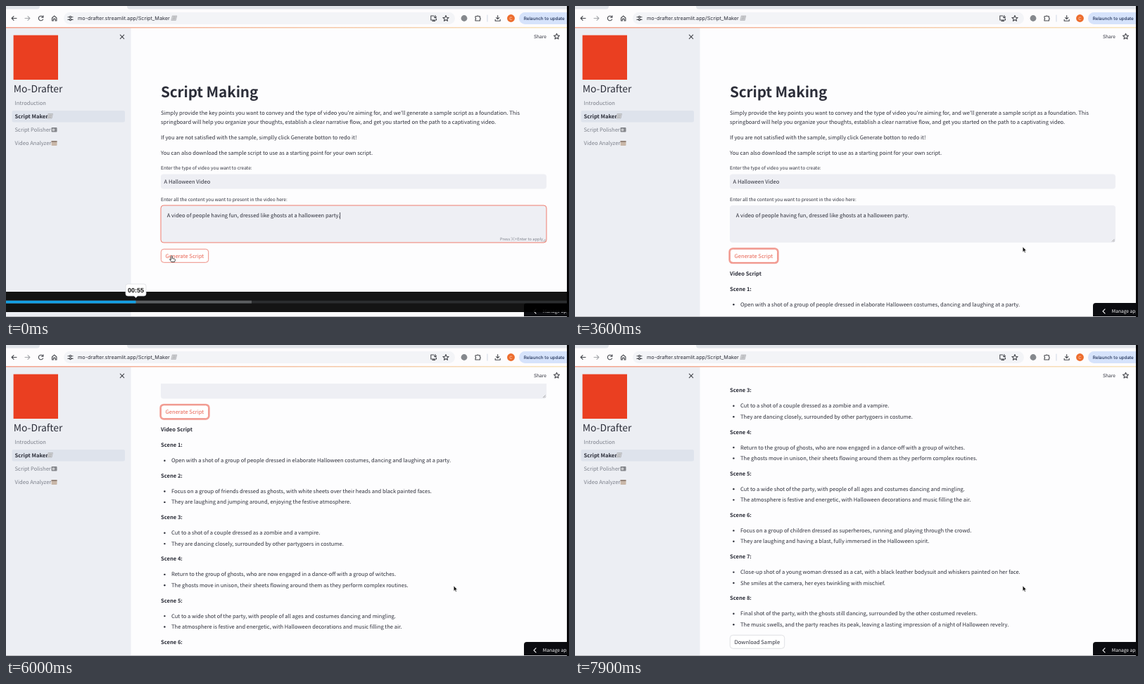
Recreate the animation shown at these times as an HTML page. Size 800x443 px, loop 8000 ms.

```html
<!DOCTYPE html>
<html lang="en">
<head>
<meta charset="utf-8">
<title>Script Making</title>
<style>
  html, body { margin: 0; width: 100%; height: 100%; overflow: hidden; background: #fdfdfe; }
  svg { display: block; width: 100vw; height: 100vh; }
  text {
    font-family: "Noto Sans CJK JP", "Noto Sans CJK SC", "Noto Sans CJK", sans-serif;
    font-size: 7.58px; fill: #2c2e39; text-rendering: geometricPrecision; white-space: pre;
  }
  .small { font-size: 6.62px; }
  .bold { font-weight: 700; }
  .ui { font-family: Inter, Roboto, sans-serif; }
  .muted { fill: #7d808b; }
  .coral { fill: #e8604f; }
  .icon { fill: none; stroke: #45474d; stroke-width: 1.1; stroke-linecap: round; stroke-linejoin: round; }
  .field { fill: #eeeff4; }
</style>
</head>
<body>
<svg viewBox="0 0 800 443" preserveAspectRatio="none">
  <defs>
    <linearGradient id="accent">
      <stop offset="0" stop-color="#f3a08c"/><stop offset="1" stop-color="#f7e6bd"/>
    </linearGradient>
    <clipPath id="pageClip"><rect x="178" y="55" width="619" height="388"/></clipPath>
    <path id="star" d="M0-4 1.2-1.3 4.1-1 1.9.9 2.5 3.8 0 2.3-2.5 3.8-1.9.9-4.1-1-1.2-1.3Z"/>
    <g id="sheet">
      <path d="M1.5-3.5H8L6.5 3H0Z" fill="#d5d6d8" stroke="#a3a5aa" stroke-width=".6"/>
      <path d="M2.4-1.8H6.6M2-.1H6.2M1.6 1.5H5.6" stroke="#96989d" stroke-width=".6"/>
    </g>
  </defs>

  <rect width="800" height="443" fill="#fdfdfe"/>

  <g clip-path="url(#pageClip)">
    <g id="page">
      <text class="bold" x="220" y="130.4" style="font-size:20.7px;letter-spacing:-.1px">Script Making</text>
      <text x="220" y="154.7">Simply provide the key points you want to convey and the type of video you're aiming for, and we'll generate a sample script as a foundation. This</text>
      <text x="220" y="168.1">springboard will help you organize your thoughts, establish a clear narrative flow, and get you started on the path to a captivating video.</text>
      <text x="220" y="189.8">If you are not satisfied with the sample, simplly click Generate botton to redo it!</text>
      <text x="220" y="211.8">You can also download the sample script to use as a starting point for your own script.</text>
      <text class="small" x="220" y="233.3">Enter the type of video you want to create:</text>
      <rect class="field" x="220" y="239.5" width="548" height="21" rx="4"/>
      <text x="224.6" y="252.7">A Halloween Video</text>
      <text class="small" x="220" y="277.8">Enter all the content you want to present in the video here:</text>
      <rect class="field" x="220" y="284" width="548" height="53" rx="4"/>
      <text x="228.8" y="301.2">A video of people having fun, dressed like ghosts at a halloween party.</text>
      <path d="M763 335.6 766.6 332M765 335.8 766.8 334" stroke="#888" stroke-width=".7"/>
      <g id="typing">
        <rect x="220" y="284" width="548" height="53" rx="4" fill="none" stroke="#ef7d6e"/>
        <path d="M474.6 294V303.5" stroke="#2c2e39" stroke-width=".8"/>
        <text class="muted" x="702" y="334.4" style="font-size:5.65px">Press ⌘+Enter to apply</text>
      </g>
      <rect id="ring" x="219.4" y="345.4" width="69.2" height="20.8" rx="4.6" fill="none" stroke="#f3a097" stroke-width="2.2"/>
      <rect x="220.3" y="346.3" width="67.4" height="19" rx="4" fill="#fff" stroke="#ec8275" stroke-width=".9"/>
      <text class="coral" x="226.6" y="358.6">Generate Script</text>
      <g id="script"></g>
    </g>
  </g>

  <!-- Sidebar -->
  <rect y="31" width="177.5" height="412" fill="#eceef3"/>
  <rect x="10.6" y="41.6" width="63.4" height="63.4" fill="#ea3f21"/>
  <path class="icon" d="M162.3 41.2 167.7 46.6M167.7 41.2 162.3 46.6"/>
  <text x="10.8" y="123.4" style="font-size:13.9px">Mo-Drafter</text>
  <rect x="8.5" y="149" width="160.5" height="16.5" rx="2" fill="#dee3ec"/>
  <text class="muted" x="12.6" y="141">Introduction</text>
  <text class="bold" x="12.6" y="160">Script Maker</text>
  <text class="muted" x="12.6" y="179">Script Polisher</text>
  <text class="muted" x="12.6" y="198">Video Analyzer</text>
  <use href="#sheet" x="58.5" y="157"/>
  <rect x="64.5" y="173" width="8" height="6.5" rx="1" fill="#85878c"/>
  <circle cx="67.5" cy="176.3" r="1.9" fill="#c9cacd"/>
  <rect x="64.5" y="192" width="8" height="7" rx="1" fill="#c9b7a8"/>
  <path d="M64.5 193H72.5" stroke="#85746b" stroke-width="1.5"/>

  <!-- Browser bar -->
  <rect width="800" height="31" fill="#fdfcfd"/>
  <path d="M0 0H48Q48 4.5 44 4.5H0ZM172 0H800V4.5H176Q172 4.5 172 0Z" fill="#e2e5ea"/>
  <rect x="82" y="9" width="556" height="17" rx="8.5" fill="#f3f4f7"/>
  <rect y="30" width="800" height="1.5" fill="url(#accent)"/>
  <g class="icon">
    <path d="M15 17.5H8.3M11 14.6 8.1 17.5 11 20.4"/>
    <path d="M27 17.5H33.7M31 14.6 33.9 17.5 31 20.4" stroke="#a5a7ab"/>
    <path d="M52.6 16A3.3 3.3 0 1 0 52.6 19M52.9 13.9V16.3H50.5"/>
    <path d="M65.5 17 68.7 14.1 71.9 17V21H70V18.4H67.4V21H65.5Z"/>
    <path d="M88 15.7H90M93 15.7H95M88 19.4H90.2M93 19.4H95"/>
    <circle cx="91.5" cy="15.7" r="1.2"/><circle cx="91.5" cy="19.4" r="1.2"/>
    <path d="M608 14H603.8V20H611.5V18M606 21.4H609.5M610 13.6V17M608.4 15.6 610 17.2 611.6 15.6"/>
    <use href="#star" x="625" y="17.5"/>
    <path d="M667 14.7H669.2A1.2 1.2 0 0 1 671.4 14.7H673.5V17A1.2 1.2 0 0 1 673.5 19.2V21H667V19.2A1.2 1.2 0 0 0 667 17Z"/>
    <path d="M698.7 13.6V18.5M696.6 16.6 698.7 18.7 700.8 16.6M695.2 19.3V21.2H702.2V19.3"/>
    <path d="M684 13V22" stroke="#d4dbe8"/>
    <use href="#star" x="782.5" y="43.2"/>
  </g>
  <circle cx="651" cy="17.5" r="4.4" fill="#85888d"/>
  <circle cx="717.5" cy="17.5" r="5.4" fill="#ed6c2d"/>
  <text class="ui" x="717.5" y="19.7" text-anchor="middle" style="font-size:6px;fill:#fbd9c6">C</text>
  <text class="ui" x="102" y="20.2" style="font-size:7.25px">mo-drafter.streamlit.app/Script_Maker</text>
  <use href="#sheet" x="234.8" y="17.4"/>
  <rect x="729" y="9" width="80" height="17" rx="8.5" fill="#d6e3fb"/>
  <text class="ui" x="735.8" y="19.8" style="font-size:6.3px;font-weight:500;fill:#1d2f56">Relaunch to update</text>

  <!-- Page header -->
  <text class="small" x="750" y="45.7">Share</text>
  <g id="running">
    <g class="icon" style="stroke:#9a9ca3;stroke-width:.9">
      <circle cx="661" cy="45.8" r="2.6"/><circle cx="668.6" cy="45.8" r="2.6"/>
      <circle cx="666.6" cy="38.3" r="1"/>
      <path d="M661 45.8 663 42.2 666 40.5 668 42.5 669.6 42.6M663 42.2 665.2 44 664.6 46.5M667 42.4 668.6 45.8"/>
    </g>
    <text class="small" x="676" y="45.7" style="fill:#a3a5ad">RUNNING...</text>
    <text class="small" x="722" y="45.7">Stop</text>
  </g>

  <path d="M736 443V427Q736 423 740 423H800V443Z" fill="#0b0c10"/>
  <path class="icon" d="M753 431.8 750 434.8 753 437.8" style="stroke:#fff"/>
  <text class="small" x="762.8" y="437.3" style="fill:#fff">Manage app</text>
  <rect y="442" width="800" height="1" fill="#b4b5b9"/>
  <rect x="797" width="3" height="443" fill="#08080a"/>

  <g id="player">
    <rect y="407" width="800" height="29" fill="#000" fill-opacity=".92"/>
    <rect y="419.7" width="797" height="3.8" fill="#2b2d2f"/>
    <rect y="419.7" width="349" height="3.8" fill="#5c5e60"/>
    <rect id="played" y="419.7" height="3.8" fill="#139fe3"/>
    <g id="bubble">
      <path d="M-11.5 396H11.5Q14.5 396 14.5 399V410Q14.5 413 11.5 413H2.5L0 415.5-2.5 413H-11.5Q-14.5 413-14.5 410V399Q-14.5 396-11.5 396Z" fill="#fff" stroke="#d9dade" stroke-width=".7"/>
      <text y="407.8" text-anchor="middle" style="font:700 9px 'Liberation Sans',sans-serif;fill:#111">00:55</text>
    </g>
  </g>

  <path id="hand" d="M-.9.8Q0-.6.9.8V4L4.2 4.8Q5.2 5.2 4.9 6.5L4 9H-.5L-3 5.2Q-2.4 4.6-1 5.8Z" fill="#fff" stroke="#222" stroke-width=".8"/>
  <path id="arrow" d="M0 0V7.4L1.7 5.9 2.9 8.6 4.1 8.1 2.9 5.5H5.2Z" fill="#111" stroke="#fff" stroke-width=".5"/>
</svg>

<script>
const $ = id => document.getElementById(id);

const scenes = [
  ["Open with a shot of a group of people dressed in elaborate Halloween costumes, dancing and laughing at a party."],
  ["Focus on a group of friends dressed as ghosts, with white sheets over their heads and black painted faces.",
   "They are laughing and jumping around, enjoying the festive atmosphere."],
  ["Cut to a shot of a couple dressed as a zombie and a vampire.",
   "They are dancing closely, surrounded by other partygoers in costume."],
  ["Return to the group of ghosts, who are now engaged in a dance-off with a group of witches.",
   "The ghosts move in unison, their sheets flowing around them as they perform complex routines."],
  ["Cut to a wide shot of the party, with people of all ages and costumes dancing and mingling.",
   "The atmosphere is festive and energetic, with Halloween decorations and music filling the air."],
  ["Focus on a group of children dressed as superheroes, running and playing through the crowd.",
   "They are laughing and having a blast, fully immersed in the Halloween spirit."],
  ["Close-up shot of a young woman dressed as a cat, with a black leather bodysuit and whiskers painted on her face.",
   "She smiles at the camera, her eyes twinkling with mischief."],
  ["Final shot of the party, with the ghosts still dancing, surrounded by the other costumed revelers.",
   "The music swells, and the party reaches its peak, leaving a lasting impression of a night of Halloween revelry."]
];

const line = (x, y, text, cls = "") => `<text class="${cls}" x="${x}" y="${y}">${text}</text>`;

function buildScript() {
  const headingGap = 22, itemGap = 15.4, sceneGap = 6.4;
  let y = 405.8;
  let out = line(220, 383.7, "Video Script", "bold");
  scenes.forEach((items, i) => {
    out += line(220, y, `Scene ${i + 1}:`, "bold");
    y += headingGap;
    for (const item of items) {
      out += `<circle cx="225.4" cy="${y - 2.5}" r="1.2" fill="#2c2e39"/>` + line(235, y, item);
      y += itemGap;
    }
    y += sceneGap;
  });
  out += `<rect x="220.3" y="854.8" width="77.4" height="19" rx="4" fill="#fff" stroke="#d9dade" stroke-width=".8"/>`;
  return out + line(226.6, 867.1, "Download Sample");
}
$("script").innerHTML = buildScript();

const clamp = v => Math.min(1, Math.max(0, v));
const smooth = v => v * v * (3 - 2 * v);
const progress = (t, from, to) => clamp((t - from) / (to - from));
const show = (id, on) => $(id).setAttribute("visibility", on ? "visible" : "hidden");
const move = (id, x, y) => $(id).setAttribute("transform", `translate(${x} ${y})`);

const LOOP = 8000, CLICK = 600, RUN = 900, RESULT = 2500;

// Each scroll: start time, end time, distance
const scrolls = [[4100, 4800, 174.3], [5750, 6000, 86.2], [6000, 7000, 97.5], [7000, 7900, 83.5]];

function draw(t) {
  show("typing", t < CLICK);
  show("ring", t >= CLICK);
  show("running", t >= RUN && t < RESULT);
  show("script", t >= RESULT);

  const scroll = scrolls.reduce((sum, [from, to, d]) => sum + d * progress(t, from, to), 0);
  move("page", 0, -scroll);

  const played = 184.5 + 5 * Math.max(0, t - 400) / 1000;
  $("played").setAttribute("width", played);
  move("bubble", played, 0);
  $("player").setAttribute("opacity", 1 - progress(t, 2100, 2300));

  const k = smooth(progress(t, 3150, 3500));
  const x = 235.5 + 400.7 * k, y = 355.5 - 12.5 * k;
  show("hand", x < 288);
  show("arrow", x >= 288);
  move("hand", x, y);
  move("arrow", x, y);
}

function tick() {
  draw(performance.now() % LOOP);
  requestAnimationFrame(tick);
}
tick();
</script>
</body>
</html>
```
